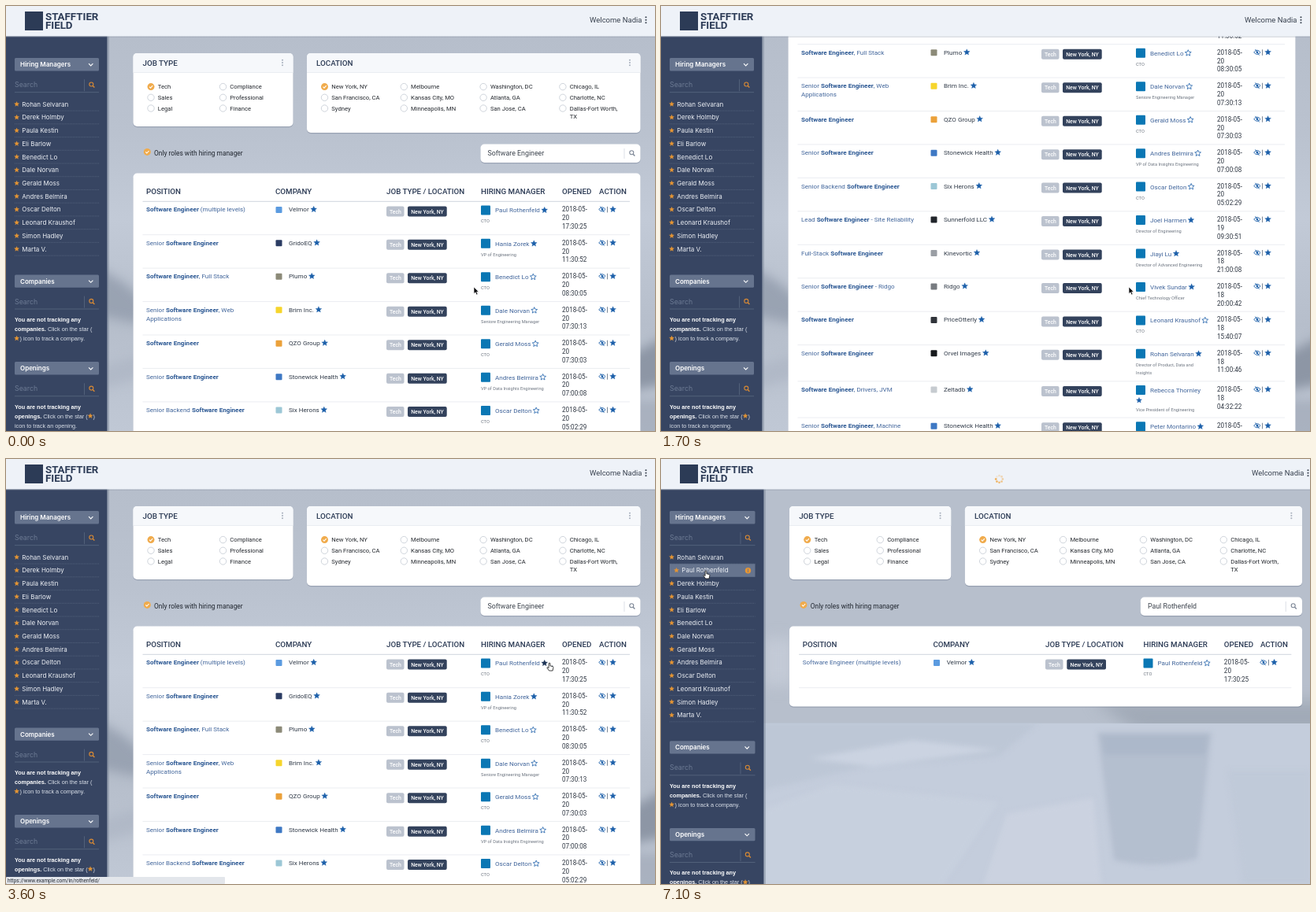
An HTML page that plays this animation: 824 px wide and 540 px high, repeating every 7200 ms.

```html
<!DOCTYPE html>
<html lang="en">
<head>
<meta charset="utf-8">
<title>Hiring dashboard</title>
<style>
html, body { margin: 0; width: 100%; height: 100%; overflow: hidden; background: #b9c1ce; }
svg { display: block; }
text { white-space: pre; }
</style>
</head>
<body>
<script>
const LOOP = 7200, STEP = 100;
const ROBOTO = 'Roboto, Arial, sans-serif';
const INTER = 'Inter, "Open Sans", sans-serif';
const ARIAL = '"Liberation Sans", Arial, sans-serif';
const ORANGE = '#f0ab4c', BLUE = '#1d60aa', LINK = '#41659b', NAVY = '#2b3a54', RULE = '#586781';

const people = ['Rohan Selvaran', 'Derek Holmby', 'Paula Kestin', 'Eli Barlow', 'Benedict Lo',
  'Dale Norvan', 'Gerald Moss', 'Andres Belmira', 'Oscar Delton', 'Leonard Kraushof',
  'Simon Hadley', 'Marta V.'];
const added = 'Paul Rothenfeld';
const morePeople = [people[0], added, ...people.slice(1)];

// position, company, icon colour, manager, tracked, title, day, time, height
const SE = '*Software Engineer*';
const rows = [
  [SE + ' (multiple levels)', 'Velmor', '#5b9be0', added, 1, 'CTO', '20', '17:30:25'],
  ['Senior ' + SE, 'GridoEQ', '#2b3c63', 'Hania Zorek', 1, 'VP of Engineering', '20', '11:30:52'],
  [SE + ', Full Stack', 'Plumo', '#8c8a78', 'Benedict Lo', 0, 'CTO', '20', '08:30:05'],
  ['Senior ' + SE + ', Web|Applications', 'Brim Inc.', '#f6d52c', 'Dale Norvan', 0, 'Seniore Engineering Manager', '20', '07:30:13'],
  [SE, 'QZO Group', '#eba13a', 'Gerald Moss', 0, 'CTO', '20', '07:30:03'],
  ['Senior ' + SE, 'Stonewick Health', '#3e78c4', 'Andres Belmira', 0, 'VP of Data Insights Engineering', '20', '07:00:08'],
  ['Senior Backend ' + SE, 'Six Herons', '#9cc7d6', 'Oscar Delton', 0, 'CTO', '20', '05:02:29'],
  ['Lead ' + SE + ' - Site Reliability', 'Sunnerfold LLC', '#20242a', 'Joel Harmen', 1, 'Director of Engineering', '19', '09:30:51'],
  ['Full-Stack ' + SE, 'Kinevortic', '#9a9ea4', 'Jiayi Lu', 1, 'Director of Advanced Engineering', '18', '21:00:08'],
  ['Senior ' + SE + ' - Ridgo', 'Ridgo', '#777b80', 'Vivek Sundar', 1, 'Chief Technology Officer', '18', '20:00:42'],
  [SE, 'PriceOtterly', '#30343a', 'Leonard Kraushof', 0, 'CTO', '18', '15:40:07'],
  ['Senior ' + SE, 'Orvel Images', '#16181b', 'Rohan Selvaran', 1, 'Director of Product, Data and|Insights', '18', '11:00:46', 46.2],
  [SE + ', Drivers, JVM', 'Zeltadb', '#c6cbd0', 'Rebecca Thornley', 2, 'Vice President of Engineering', '18', '04:32:22', 46.2],
  ['Senior ' + SE + ', Machine|Learning', 'Stonewick Health', '#3e78c4', 'Peter Montarino', 1, 'VP of Engineering', '18', '04:00:11']
];

function el(parent, tag, attrs = {}, text) {
  const e = document.createElementNS('http://www.w3.org/2000/svg', tag);
  for (const k in attrs) e.setAttribute(k, attrs[k]);
  if (text !== undefined) e.textContent = text;
  if (parent) parent.appendChild(e);
  return e;
}
const group = (p, attrs) => el(p, 'g', attrs);
const rect = (p, x, y, x2, y2, fill, rx = 0, more = {}) =>
  el(p, 'rect', { x, y, width: x2 - x, height: y2 - y, fill, rx, ...more });
const line = (p, x1, y1, x2, y2, stroke, more = {}) =>
  el(p, 'line', { x1, y1, x2, y2, stroke, 'stroke-width': .8, ...more });
const path = (p, d, more) => el(p, 'path', { d, fill: 'none', ...more });
const circle = (p, cx, cy, r, fill, more = {}) => el(p, 'circle', { cx, cy, r, fill, ...more });

// Parts between asterisks are bold.
function label(p, x, y, s, size, fill, weight = 400, family = ROBOTO, boldFill = fill) {
  const t = el(p, 'text', { x, y, fill, 'font-size': size, 'font-weight': weight, 'font-family': family });
  s.split('*').forEach((part, i) => {
    if (part) el(t, 'tspan', i % 2 ? { 'font-weight': 700, fill: boldFill } : {}, part);
  });
  return x + t.getComputedTextLength();
}
function star(p, cx, cy, r, color, solid = true) {
  let pts = '';
  for (let i = 0; i < 10; i++) {
    const a = i * Math.PI / 5, d = i % 2 ? r * .46 : r;
    pts += (cx + d * Math.sin(a)).toFixed(2) + ',' + (cy - d * Math.cos(a)).toFixed(2) + ' ';
  }
  return el(p, 'polygon', { points: pts, fill: solid ? color : 'none', stroke: color, 'stroke-width': solid ? .3 : .8 });
}
function lens(p, x, y, color) {
  circle(p, x - .7, y - .7, 2.5, 'none', { stroke: color, 'stroke-width': 1.1 });
  line(p, x + 1.2, y + 1.2, x + 3.4, y + 3.4, color, { 'stroke-width': 1.4 });
}
function dots(p, x, y, color, gap = 3.3) {
  for (const k of [-1, 0, 1]) circle(p, x, y + k * gap, 1.05, color);
}
function tick(p, x, y) {
  circle(p, x, y, 4.5, ORANGE);
  path(p, `M${x - 2} ${y}l1.5 1.6 2.7-3`, { stroke: '#fff', 'stroke-width': 1.1 });
}
function card(p, x, y, x2, y2) {
  rect(p, x, y + 1.3, x2, y2 + 1.3, '#3c4a63', 5, { opacity: .25 });
  rect(p, x, y, x2, y2, '#fff', 5);
}

const root = el(document.body, 'svg', { width: 824, height: 540, viewBox: '0 0 824 540' });
const defs = el(root, 'defs');
const tone = el(defs, 'linearGradient', { id: 'tone', x1: 0, y1: 0, x2: 0, y2: 1 });
[[0, '#b5bdca'], [.3, '#bac2cf'], [.5, '#c2cad7'], [.75, '#b6becb'], [1, '#c0c8d5']]
  .forEach(([offset, c]) => el(tone, 'stop', { offset, 'stop-color': c }));

// Soft landscape behind the cards
rect(root, 0, 0, 824, 540, 'url(#tone)');
const land = group(root, { style: 'filter:blur(7px)' });
path(land, 'M110 328L150 352L190 386L190 408L110 392Z', { fill: '#929cac', opacity: .8 });
path(land, 'M110 462L180 440V470L110 490Z', { fill: '#aab3c1', opacity: .6 });
path(land, 'M780 450L840 418V480L780 492Z', { fill: '#858f9e', opacity: .85 });
path(land, 'M780 500H840V560H780Z', { fill: '#a0a9b7', opacity: .7 });

function buildMain(wide) {
  const g = group(root);
  const X = wide ? x => 163 + (x - 161.5) * 1.0109 : x => x;
  if (wide) {
    rect(g, 129, 38, 824, 336, '#b7bfcc');
    const top = el(g, 'svg', { x: 129, y: 38, width: 695, height: 297.5 });
    const shade = group(top, { style: 'filter:blur(9px)' });
    path(shade, 'M420 270H720V310H480Z', { fill: '#9aa3b0', opacity: .75 });
    path(shade, 'M0 190H40V250H0Z', { fill: '#c3cad6' });
    const low = el(g, 'svg', { x: 129, y: 335.5, width: 695, height: 205 });
    rect(low, 0, 0, 695, 205, '#c4cddc');
    const s = group(low, { style: 'filter:blur(3px)' });
    path(s, 'M425 12H570L552 172Q500 186 446 174Z', { fill: '#b2bccd', opacity: .85 });
    path(s, 'M430 15H566L562 40H434Z', { fill: '#a9b4c6', opacity: .7 });
    path(s, 'M0 0H350L300 42L130 56L0 85Z', { fill: '#bcc6d5', opacity: .8 });
    path(s, 'M60 45L190 22L300 34L140 55Z', { fill: '#cbd3e1' });
    path(s, 'M0 110L90 78L300 100L230 205H0Z', { fill: '#c9d1df', opacity: .8 });
    path(s, 'M310 115L420 95L430 205H280Z', { fill: '#cdd4e1', opacity: .8 });
    path(s, 'M590 60H695V205H610Z', { fill: '#bec8d7', opacity: .6 });
  }

  const scroll = group(g);
  const box = (title, x, x2, y2) => {
    card(scroll, X(x), 60, X(x2), y2);
    path(scroll, `M${X(x)} 84.5V65q0-5 5-5H${X(x2) - 5}q5 0 5 5V84.5Z`, { fill: '#f6f8fb' });
    line(scroll, X(x), 84.5, X(x2), 84.5, '#e6eaf0');
    label(scroll, X(x + 12), 75.5, title, 9.8, NAVY, 500);
    dots(scroll, X(x2 - 13.5), 72, '#a9b1be');
  };
  const option = (x, y, s, on) => {
    if (on) tick(scroll, X(x), y);
    else circle(scroll, X(x), y, 4.2, '#fff', { stroke: '#c3c9d2', 'stroke-width': .8 });
    s.split('|').forEach((l, i) => label(scroll, X(x + 8.8), y + 2.6 + i * 10.2, l, 7.65, '#22262c'));
  };
  const grid = (names, x, dx) => names.forEach((s, i) =>
    option(x + Math.floor(i / 3) * dx, 102.6 + i % 3 * 13.7, s, !i));
  box('JOB TYPE', 161.5, 364.5, 153);
  grid(['Tech', 'Sales', 'Legal', 'Compliance', 'Professional', 'Finance'], 184, 91.5);
  box('LOCATION', 382, 805.5, 161);
  grid(['New York, NY', 'San Francisco, CA', 'Sydney', 'Melbourne', 'Kansas City, MO', 'Minneapolis, MN',
    'Washington, DC', 'Atlanta, GA', 'San Jose, CA', 'Chicago, IL', 'Charlotte, NC', 'Dallas-Fort Worth,|TX'], 404.5, 100.8);

  tick(scroll, X(179.3), 185.4);
  label(scroll, X(188), 190, 'Only roles with hiring manager', 8.4, '#20262f');
  card(scroll, X(602.5), 175.5, X(805.5), 199);
  label(scroll, X(611.5), 190.3, wide ? added : 'Software Engineer', 8.85, '#3c434d');
  line(scroll, X(785), 181, X(785), 194, '#d5dae1');
  lens(scroll, X(795), 187, '#7c8696');

  card(scroll, X(161.5), 212.5, X(805.5), wide ? 314.5 : 905);
  const hx = X(603) + (wide ? 3.2 : 0), ox = X(706) + (wide ? 1.4 : 0), ax = X(753);
  [['POSITION', X(178)], ['COMPANY', X(342)], ['JOB TYPE / LOCATION', X(483)], ['HIRING MANAGER', hx],
    ['OPENED', ox], ['ACTION', ax]].forEach(([s, x]) => label(scroll, x, 239, s, 9.75, NAVY, 500));
  line(scroll, X(173.5), 248.3, X(792), 248.3, '#cfd5de', { 'stroke-width': 1 });

  let y = 258.4, clicked;
  for (const [pos, firm, color, who, tracked, title, day, time, h = 42.45] of wide ? rows.slice(0, 1) : rows) {
    const base = y + 3;
    pos.split('|').forEach((l, i) =>
      label(scroll, X(178), base + i * 11, wide ? l.replaceAll('*', '') : l, 8.1, LINK, 400, ROBOTO, '#295692'));
    rect(scroll, X(346.5) - 4, y - 3.5, X(346.5) + 4, y + 4.5, color, 1);
    const end = label(scroll, X(359), base, firm, 8.1, '#303a48');
    star(scroll, end + 6, y, 4.1, BLUE);
    rect(scroll, X(483), y - 4, X(483) + 22.5, y + 9, '#bbc2ce', 2);
    label(scroll, X(483) + 3.9, y + 5.1, 'Tech', 6.9, '#fff', 500);
    rect(scroll, X(510), y - 4, X(510) + 49.7, y + 9, '#33425c', 2);
    label(scroll, X(510) + 4.2, y + 5.1, 'New York, NY', 6.9, '#fff', 500);
    rect(scroll, hx, y - 5, hx + 12, y + 7, '#0a77b4', 1);
    const nameEnd = label(scroll, hx + 18, y + 4, who, 8.1, LINK);
    const wrap = tracked === 2;
    const s = star(scroll, wrap ? hx + 4 : nameEnd + 5.8, wrap ? y + 14 : y + 1, wrap ? 3.8 : 4.1, BLUE, tracked && !wide);
    clicked = clicked || s;
    title.split('|').forEach((l, i) => label(scroll, hx, y + (wrap ? 27.5 : 17) + i * 10.5, l, 5.7, '#6d7580'));
    ['2018-05-', day, time].forEach((l, i) => label(scroll, ox, base + i * 10.8, l, 8.15, '#2d3541'));
    path(scroll, `M${ax - .3} ${y}q4.2-5.2 8.4 0q-4.2 5.2-8.4 0Z`, { stroke: BLUE, 'stroke-width': .9 });
    circle(scroll, ax + 4, y, 1.4, BLUE);
    line(scroll, ax + 1.5, y - 3.8, ax + 6.5, y + 3.8, BLUE, { 'stroke-width': .9 });
    line(scroll, ax + 10.5, y - 3.5, ax + 10.5, y + 4, '#596679');
    star(scroll, ax + 17.6, y, 4.1, BLUE);
    y += h;
    line(scroll, X(173.5), y - 10.2, X(792), y - 10.2, '#e6e9ee');
  }
  return { g, scroll, clicked };
}

function buildSide(names, hover = -1, wide = false, busy = false) {
  const g = group(root), edge = wide ? 130.5 : 128.5, right = wide ? 119.5 : 118;
  rect(g, edge, 38, edge + 2.5, 540, '#7f8a9b', 0, { opacity: .5 });
  rect(g, 0, 38, edge, 540, '#374562');
  const head = (y, s) => {
    rect(g, 11, y - 8.2, right, y + 8.2, '#66748e', 1.5);
    label(g, 18, y + 3, s, 8, '#fff', 600, INTER);
    path(g, `M${right - 13} ${y - 1}l2.7 2.7 2.7-2.7`, { stroke: '#fff', 'stroke-width': 1.1 });
    label(g, 11, y + 29, 'Search', 8.8, '#6c7a93', 400, INTER);
    line(g, right - 18.5, y + 19, right - 18.5, y + 34, RULE);
    lens(g, right - 9, y + 26, '#d98a34');
    line(g, 11, y + 35.4, right, y + 35.4, RULE);
  };
  head(74.2, 'Hiring Managers');
  names.forEach((s, i) => {
    const y = 124.7 + i * 16.73, on = i === hover, dx = on ? 6 : 0;
    if (on) rect(g, 11, y - 8.2, right, y + 8.4, '#66748e');
    else line(g, 11, y + 8.4, right, y + 8.4, RULE, { 'stroke-dasharray': '1 1' });
    star(g, 13.6 + dx, y, 3.2, '#e59534');
    label(g, 20.3 + dx, y + 2.9, s, 8, '#eef1f6', 400, INTER);
    if (on) {
      circle(g, right - 9, y + .3, 3.7, '#e59534');
      if (busy) line(g, right - 9, y - 2, right - 9, y + 2.6, '#66748e');
      else line(g, right - 11, y + .3, right - 7, y + .3, '#66748e');
    }
  });
  const dy = (names.length - 12) * 16.8;
  const note = (x, y, s) => label(g, x, y, s, 7.25, '#dbe1ea', 400, ARIAL, '#fff');
  head(349.6 + dy, 'Companies');
  note(11, 401 + dy, '*You are not tracking any*');
  note(11, 413 + dy, '*companies.* Click on the star (');
  star(g, 13.6, 422.3 + dy, 3.2, '#e59534');
  note(17.5, 425 + dy, ') icon to track a company.');
  head(460.3 + dy, 'Openings');
  note(11, 511.6 + dy, '*You are not tracking any*');
  const end = note(11, 523.6 + dy, '*openings.* Click on the star (');
  star(g, end + 3.4, 520.9 + dy, 3.2, '#e59534');
  note(end + 6.8, 523.6 + dy, ')');
  note(11, 535.6 + dy, 'icon to track an opening.');
  return g;
}

const main = buildMain(false), result = buildMain(true);
const mark = circle(main.scroll, 693.8, 263.3, .8, '#1d3355');

const sides = [
  [0, buildSide(people)],
  [4900, buildSide(morePeople)],
  [5400, buildSide(morePeople, 0)],
  [6300, buildSide(morePeople, 1)],
  [6400, buildSide(morePeople, 1, false, true)],
  [6700, buildSide(morePeople, 1, true, true)]
];

// Header
rect(root, 0, 38, 824, 40, '#8993a3', 0, { opacity: .3 });
rect(root, 0, 0, 824, 38.5, '#eef2f8');
rect(root, 24, 7, 47, 31, '#2c3b56');
label(root, 50, 18, 'STAFFTIER', 13.3, '#2c3b56', 600);
label(root, 50, 28.8, 'FIELD', 13.3, '#2c3b56', 600);
const user = group(root);
label(user, 741, 21, 'Welcome Nadia', 9.5, '#39424f');
dots(user, 812.5, 17.7, '#39424f', 3.5);

const loader = group(root);
const beads = Array.from({ length: 8 }, (_, i) =>
  circle(loader, 4.3 * Math.cos(i * Math.PI / 4), 4.3 * Math.sin(i * Math.PI / 4), 1.35, ORANGE));

const status = group(root);
rect(status, 0, 531, 278, 540, '#e3e6eb', 1);
label(status, 2, 538, 'https://www.example.com/in/rothenfeld/', 6.4, '#20262f');

const arrow = path(root, 'M0 0V8.6L2 6.8L3.4 10L5 9.3L3.6 6.2H6.2Z', { fill: '#0c0c0e', stroke: '#fff', 'stroke-width': .6 });
const hand = path(root, 'M-.9 5.5V.6Q0-.6 .9.6V3.8L4.2 4.6Q5 5 4.8 6.6L4 10H-.4L-3 6.6Q-3.2 5.4-2 5.6L-.9 6.6Z',
  { fill: '#fff', stroke: '#111', 'stroke-width': .8 });

const scrollKeys = [[800, 0], [1000, 50], [1200, 115], [1600, 264], [1700, 284.5], [1800, 284.5], [2000, 190], [2200, 55], [2400, 0]];
const pointerX = [[2400, 594], [3300, 690], [3900, 690], [4700, 329], [5400, 57]];
const pointerY = [[2400, 357], [3300, 259], [3900, 259], [4700, 192], [5400, 128], [5500, 128], [6200, 133], [6300, 142]];
const statusKeys = [[3200, 0], [3300, 1], [4000, 1], [4700, .2], [4800, 0]];

function at(keys, t) {
  if (t <= keys[0][0]) return keys[0][1];
  for (let i = 1; i < keys.length; i++) {
    const [a, va] = keys[i - 1], [b, vb] = keys[i];
    if (t <= b) return va + (vb - va) * (t - a) / (b - a);
  }
  return keys[keys.length - 1][1];
}
const show = (e, on) => { e.style.display = on ? '' : 'none'; };
const move = (e, x, y) => e.setAttribute('transform', `translate(${x} ${y})`);

function draw(now) {
  const t = Math.floor(now % LOOP / STEP) * STEP;
  const wide = t >= 6700;
  show(main.g, !wide);
  show(result.g, wide);
  move(main.scroll, 0, -at(scrollKeys, t));
  const dark = t >= 3600 ? '#1d3355' : t >= 3300 ? '#174a86' : BLUE;
  main.clicked.setAttribute('fill', dark);
  main.clicked.setAttribute('stroke', dark);
  show(mark, t >= 3600);

  sides.forEach(([from, g], i) => show(g, t >= from && (i + 1 === sides.length || t < sides[i + 1][0])));
  move(user, wide ? 9 : 0, 0);

  show(loader, t >= 4000 && t < 4900 || t >= 6400);
  move(loader, wide ? 429.5 : 422, wide ? 25.5 : 27);
  const lead = t >= 6400 && t < 6700 ? 0 : t / STEP + 5;
  beads.forEach((b, i) => b.setAttribute('opacity', 1 - ((lead - i) % 8 + 8) % 8 * .12));

  status.setAttribute('opacity', at(statusKeys, t));
  const x = at(pointerX, t), y = at(pointerY, t);
  const link = t >= 3300 && t < 4000 || t >= 5400;
  show(arrow, !link);
  show(hand, link);
  move(arrow, x, y);
  move(hand, x, y);
}
function tickFrame() {
  draw(performance.now());
  requestAnimationFrame(tickFrame);
}
tickFrame();
</script>
</body>
</html>
```
